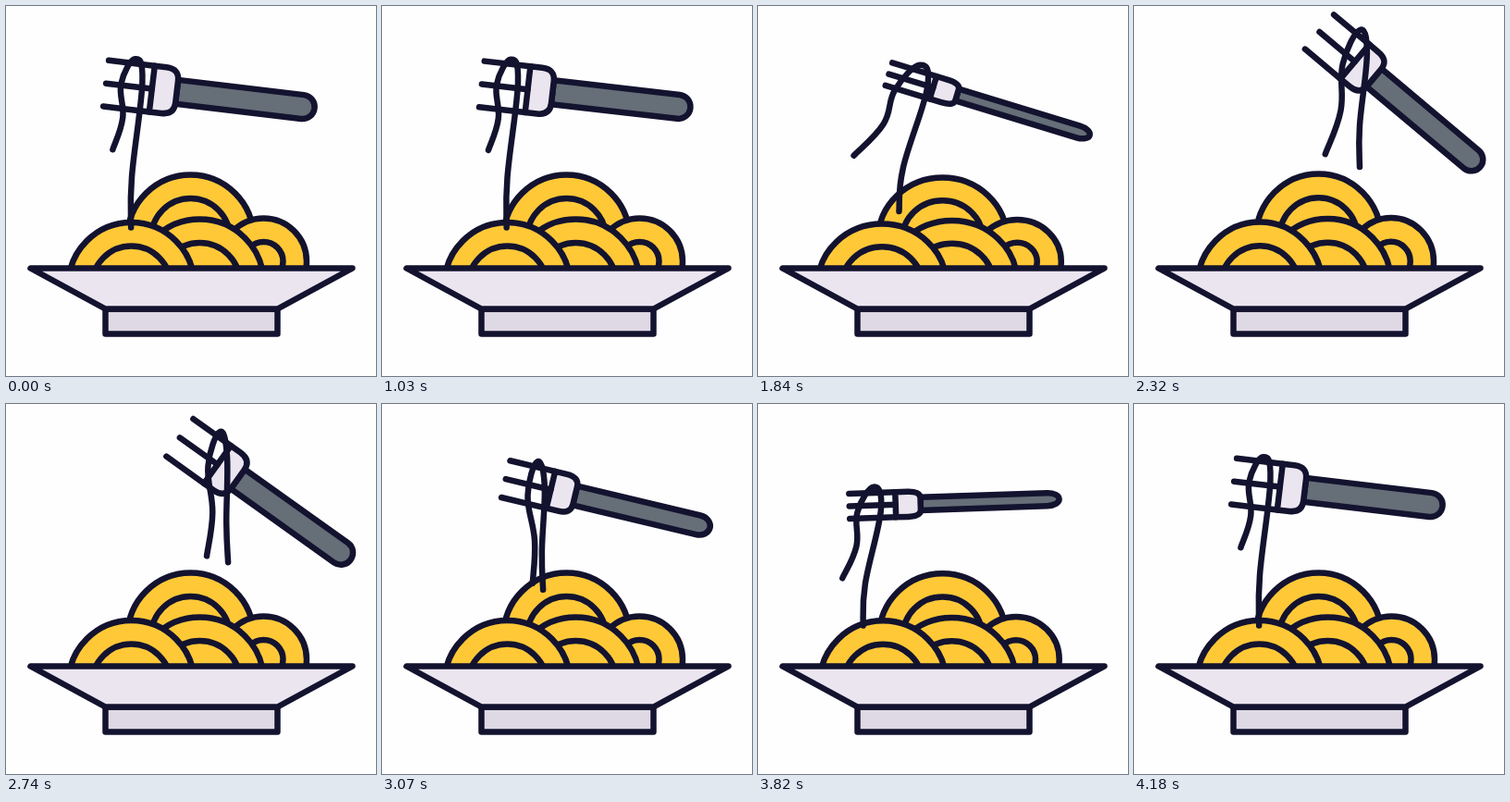
These frames come from a looping animation (400 px wide and 400 px high, 4.21 s). An HTML page:

```html
<!DOCTYPE html>
<html lang="en">
<head>
<meta charset="utf-8">
<title>Pasta</title>
<style>
  html, body { margin: 0; width: 100%; height: 100%; overflow: hidden; background: #fefefe; }
  svg { display: block; width: 100%; height: 100%; }
  svg * { vector-effect: non-scaling-stroke; }
  .ink { stroke: #13132f; stroke-width: 6.5; stroke-linecap: round; stroke-linejoin: round; fill: none; }
  .pasta { fill: #ffc837; }
  .light { fill: #ebe5f0; }
  .base { fill: #dfd9e5; }
  .grip { fill: #666e78; }
</style>
</head>
<body>
<svg viewBox="-0.5 -0.5 400 400">
  <defs><clipPath id="rim"><path d="M0 0H400V283H0Z"/></clipPath></defs>
  <g clip-path="url(#rim)"><g id="pasta" class="ink"></g></g>
  <g class="ink">
    <path class="base" d="M107 327H293V354H107Z"/>
    <path class="light" d="M26 283H374L293 327H107Z"/>
  </g>
  <g id="fork" class="ink">
    <path class="grip" d="M77-13H214A13 13 0 0 1 214 13H77Z"/>
    <path class="light" d="M50-25H63Q77-25 77-12V12Q77 25 63 25H50Z"/>
    <path d="M0-25H50M0 0H50M0 25H50"/>
  </g>
  <path id="noodle" class="ink"/>
</svg>
<script>
const LOOP = 4210, START = 1030, STEP = 30;
const $ = id => document.getElementById(id);

// Coils from back to front: centre x, centre y, outer radius
const coils = [[199, 250, 68], [278, 275.5, 46.5], [209, 299, 69], [135, 301.5, 68]];
$('pasta').innerHTML = coils.map(([x, y, r]) =>
  `<circle class="pasta" cx="${x}" cy="${y}" r="${r}"/><circle cx="${x}" cy="${y}" r="${r - 25.5}"/>`).join('');

// Eased walk through [time, value] stops
function track(t, ...stops) {
  let value = stops[0][1];
  for (let i = 1; i < stops.length; i++) {
    const [t0, a] = stops[i - 1], [t1, b] = stops[i];
    const u = Math.min(1, Math.max(0, (t - t0) / (t1 - t0)));
    value += (b - a) * u * u * (3 - 2 * u);
  }
  return value;
}

// Soft bump of height 1 around a moment
const bump = (t, mid, reach) =>
  Math.cos(Math.PI / 2 * Math.min(1, Math.abs(t - mid) / reach)) ** 2;

const lift = t => track(t, [1000, 0.317], [1360, 0.05], [2320, 1], [2560, 1], [3520, 0], [4180, 0.317]);
const resting = t => track(t, [1000, 1], [1360, 0], [3520, 0], [4180, 1]);
const slide = t => track(t, [1840, 0], [2320, 1], [2900, 1], [3900, 0]);
const squash = t => bump(t, 1840, 480) + bump(t, 3520, 450) - 0.35 * bump(t, 2320, 240);
const turn = t => 1 - 0.5 * bump(t, 1780, 640) - 0.8 * bump(t, 3520, 660);

// The fork rides a shallow arc from low left to high right
function forkPose(t) {
  const h = lift(t), sag = h * (1 - h), r = resting(t);
  return {
    x: 92.5 + 107.5 * h - 32 * sag - 12 * r,
    y: 131 - 103.5 * h - 14 * sag - 12 * r,
    angle: -8.6 + 48.6 * h,
    width: turn(t)
  };
}

// The strand hangs over the tines; its tails trail behind the fork
function strand(t, fork) {
  const h = lift(t), r = resting(t), rad = fork.angle * Math.PI / 180;
  const u = 26 + 6 * h, v = -8 - 22 * fork.width;
  const x = fork.x + u * Math.cos(rad) - v * Math.sin(rad);
  const y = fork.y + u * Math.sin(rad) + v * Math.cos(rad);

  const pull = h - lift(t - 180);
  const drag = (130 * pull + 220 * pull * pull) * (1 - r);
  const leftX = -24 - drag, leftY = 98 + 36 * slide(t);
  const rightX = -9 + 15 * h - 0.45 * drag;
  const rightY = Math.min(239 - y, 144 + 0.3 * drag + 45 * r);

  return [
    [leftX, leftY],
    [0.55 * leftX, 0.65 * leftY],
    [0.25 * leftX - 9, 27 + 10 * slide(t)],
    [0, 0],
    [8, 25],
    [0.8 * rightX, 0.7 * rightY],
    [rightX, rightY]
  ].map(([dx, dy]) => [x + dx, y + dy]);
}

function smoothPath(pts) {
  const at = i => pts[Math.max(0, Math.min(pts.length - 1, i))];
  const handle = (i, s) => at(i).map((p, c) => p + s * (at(i + 1)[c] - at(i - 1)[c]) / 5);
  let d = 'M' + pts[0];
  for (let i = 1; i < pts.length; i++) d += `C${handle(i - 1, 1)} ${handle(i, -1)} ${pts[i]}`;
  return d;
}

function draw(t) {
  const fork = forkPose(t), q = squash(t);
  $('fork').setAttribute('transform',
    `translate(${fork.x} ${fork.y}) rotate(${fork.angle}) scale(1 ${fork.width})`);
  $('noodle').setAttribute('d', smoothPath(strand(t, fork)));
  $('pasta').setAttribute('transform',
    `translate(198 283) scale(${1 + 0.022 * q} ${1 - 0.03 * q}) translate(-198 -283)`);
}

const begin = performance.now();
function tick() {
  const t = (performance.now() - begin) % LOOP;
  draw(t < START ? 0 : START + Math.floor((t - START) / STEP) * STEP);
  requestAnimationFrame(tick);
}
tick();
</script>
</body>
</html>
```
